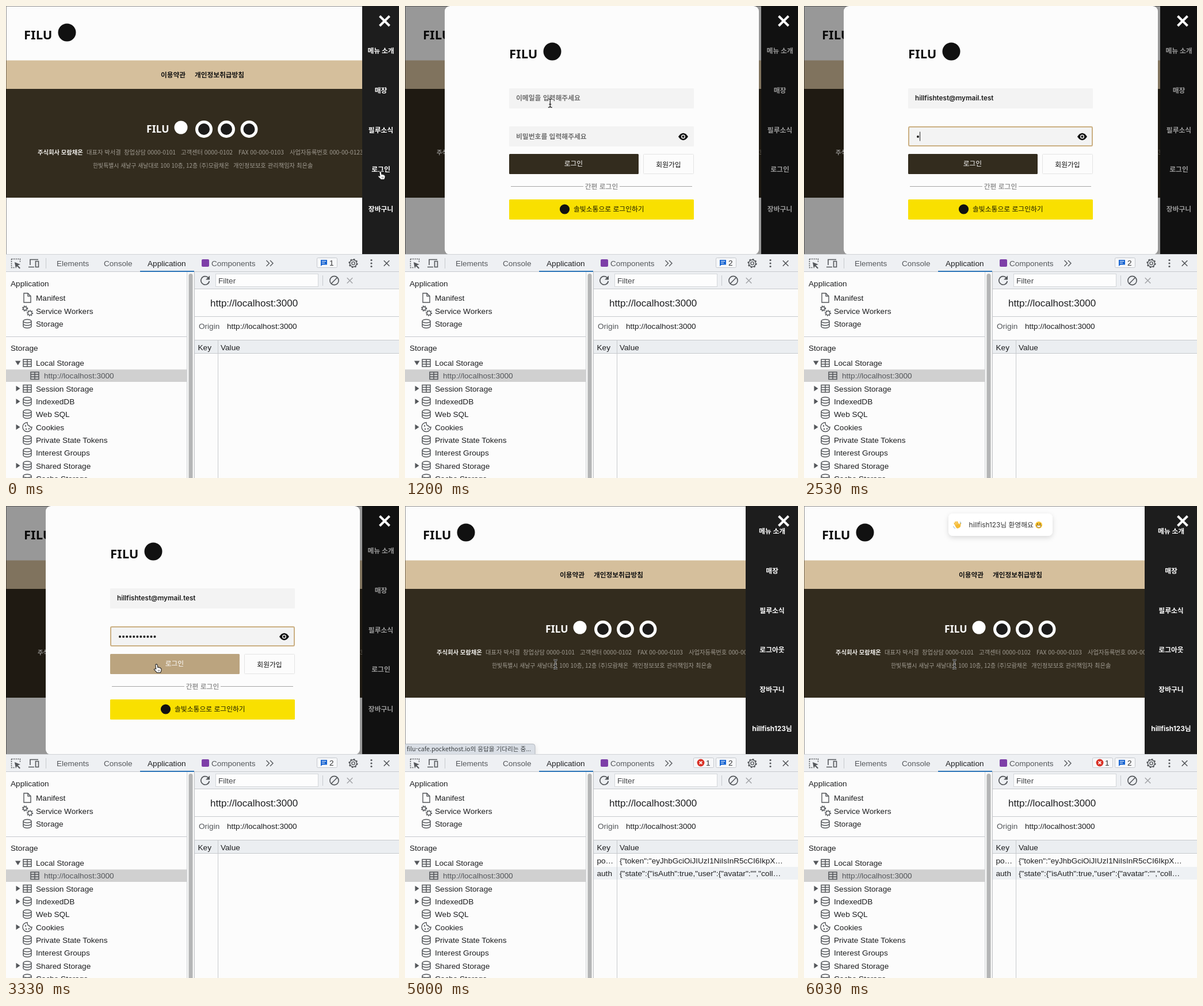
Write an HTML page that moves like this. It is 683 px wide and 820 px high and loops after 6630 ms.

```html
<!DOCTYPE html>
<html lang="ko">
<head>
<meta charset="utf-8">
<title>Login flow</title>
<style>
html, body { margin: 0; width: 100%; height: 100%; overflow: hidden; background: #fcfcfc; }
svg { display: block; width: 100vw; height: 100vh; }
text { white-space: pre; }
.sans { font-family: "Liberation Sans", Arial, sans-serif; }
.kr { font-family: "Noto Sans CJK KR", "Noto Sans CJK", sans-serif; }
.latin { font-family: Inter, "Noto Sans CJK KR", sans-serif; }
.logo { font-family: "Noto Sans", "Open Sans", sans-serif; }
</style>
</head>
<body>
<svg id="stage" viewBox="0 0 683 820"></svg>
<script>
const LOOP = 6630;
const AT = { modal: 330, focus: 1600, type: 1900, typed: 2450, pass: 2480, passType: 2520,
  passEnd: 2780, move: 2850, click: 3470, done: 5000, loaded: 5670 };
const USER = 'hillfish123', EMAIL = 'hillfishtest@mymail.test', PASS_LEN = 11;
const GRAY = '#54575b', INK = '#1d1e20', DARK = '#332c1e', PAPER = '#fcfcfc', GOLD = '#cbb083';

// Markup helpers
const text = (x, y, s, size, fill = INK, weight = 400, cls = 'kr', anchor = 'start', id = '') =>
  `<text ${id && `id="${id}"`} class="${cls}" x="${x}" y="${y}" font-size="${size}" fill="${fill}" font-weight="${weight}" text-anchor="${anchor}">${s}</text>`;
const ui = (x, y, s, fill = INK, size = 13.6) => text(x, y, s, size, fill, 400, 'sans');
const rect = (x, y, w, h, fill, extra = '') => `<rect x="${x}" y="${y}" width="${w}" height="${h}" fill="${fill}" ${extra}/>`;
const dot = (x, y, r, fill, extra = '') => `<circle cx="${x}" cy="${y}" r="${r}" fill="${fill}" ${extra}/>`;
const line = (d, stroke = GRAY, width = 1.4, extra = '') =>
  `<path d="${d}" fill="none" stroke="${stroke}" stroke-width="${width}" ${extra}/>`;
const rule = (d, stroke = '#c6c9cd') => line(d, stroke, 1);
const cross = (x, y, r, stroke, width) =>
  line(`M${x - r} ${y - r}L${x + r} ${y + r}M${x + r} ${y - r}L${x - r} ${y + r}`, stroke, width);
const group = (id, body, extra = '') => `<g id="${id}" ${extra}>${body}</g>`;
const dots = (x, y, n, step, r, fill) =>
  Array.from({ length: n }, (_, i) => dot(x + i * step, y, r, fill)).join('');

// Small icons, centred on x, y
const icon = {
  file: (x, y) => line(`M${x - 6} ${y - 8}H${x + 1}L${x + 6} ${y - 3}V${y + 8}H${x - 6}ZM${x + 1} ${y - 8}V${y - 3}H${x + 6}`),
  gears: (x, y) => [[-4, -4, 3], [4.5, 4, 3.4]].map(([a, b, r]) =>
    dot(x + a, y + b, r, 'none', `stroke="${GRAY}" stroke-width="1.4"`) +
    dot(x + a, y + b, r + 1.4, 'none', `stroke="${GRAY}" stroke-width="1.6" stroke-dasharray="1.7 1.9"`)).join(''),
  db: (x, y) => line(`M${x - 7} ${y - 4.5}a7 3 0 0 1 14 0a7 3 0 0 1 -14 0V${y + 4.5}a7 3 0 0 0 14 0V${y - 4.5}M${x - 7} ${y}a7 3 0 0 0 14 0`, GRAY, 1.5),
  grid: (x, y) => line(`M${x - 7} ${y - 6}H${x + 7}V${y + 6.5}H${x - 7}ZM${x - 7} ${y - 2}H${x + 7}M${x - 7} ${y + 2.3}H${x + 7}M${x} ${y - 6}V${y + 6.5}`, GRAY, 1.5),
  cookie: (x, y) => line(`M${x} ${y - 8}a8 8 0 1 0 8 8q-3 1-4-2q-4 0-4-6Z`) + dot(x - 3, y - 2, 1.2, GRAY) + dot(x - 2, y + 3.5, 1.2, GRAY) + dot(x + 3, y + 3, 1.2, GRAY),
};
const brand = (x, y, size, fill, mx, my, r) =>
  text(x, y, 'FILU', size, fill, 600, 'logo') + dot(mx, my, r, fill);

function page() {
  const foot = '#a19c92';
  const info = [[140, '대표자 박서결'], [205, '창업상담 0000-0101'], [304, '고객센터 0000-0102'],
    [404, 'FAX 00-000-0103'], [493, '사업자등록번호 000-00-01234']];
  return rect(0, 0, 683, 432, PAPER) + rect(0, 94.5, 683, 50, '#d5bf9c') + rect(0, 144, 683, 189, DARK) +
    brand(31, 57.5, 22, '#111', 106, 46, 15.5) +
    text(269, 123.5, '이용약관', 11.7, '#111', 700) + text(328, 123.5, '개인정보취급방침', 11.7, '#111', 700) +
    brand(244, 219.8, 17.6, '#fff', 304, 211, 11.5) +
    [344, 383, 422.5].map(x => dot(x, 214, 15, '#fff') + dot(x, 214, 10, '#1c1b1a')).join('') +
    text(55, 258, '주식회사 모람채온', 10.3, '#f2f0ec', 600) +
    info.map(([x, s]) => text(x, 258, s, 10.3, foot, 300)).join('') +
    text(151, 281, '한빛특별시 새날구 새날대로 100 10층, 12층 (주)모람채온', 9.9, foot, 300) +
    text(395, 281, '개인정보보호 관리책임자 최은솔', 10.3, foot, 300) +
    line('M0 .5H683M.5 1V432', '#000', 1, 'opacity=".42"');
}

function menu(id, x, cx, y, items) {
  return group(id, rect(x, 0, 683 - x, 432, '#1d1d1d') +
    items.map((s, i) => text(cx, y + i * 68.6 + 4.4, s, 11.8, '#fff', 700, 'latin', 'middle')).join(''));
}

function modal() {
  const field = y => rect(181, y, 321, 35, '#f3f3f3', 'rx="1"');
  const ring = (id, y) => rect(182, y + 1, 319, 33, '#f3f3f3', `id="${id}" rx="2" stroke="${GOLD}" stroke-width="2"`);
  return rect(69, 0, 546, 432, PAPER, 'rx="9"') +
    brand(181, 90.5, 22, '#111', 256, 79, 15.5) +
    field(143) + ring('ringMail', 143) + field(209) + ring('ringPass', 209) +
    text(193, 164.3, '이메일을 입력해주세요', 11.8, '#6f6f6f', 600, 'kr', 'start', 'hintMail') +
    text(193, 164.3, '', 11.7, '#1b1b1b', 600, 'latin', 'start', 'mail') +
    text(193, 230.5, '비밀번호를 입력해주세요', 11.8, '#6f6f6f', 600, 'kr', 'start', 'hintPass') +
    group('bullets', dots(196, 227, PASS_LEN, 6.05, 2, '#1b1b1b')) +
    line('M0 0V16', '#222', 1, 'id="caret"') +
    '<path d="M475 227Q483.5 214.5 492 227Q483.5 239.5 475 227Z" fill="#111"/>' +
    dot(483.5, 227, 3.5, '#f3f3f3') + dot(483.5, 227, 2.1, '#111') +
    rect(181, 257, 225, 35, DARK, 'id="login" rx="1.5"') +
    text(293, 278, '로그인', 11.7, '#fff', 500, 'kr', 'middle') +
    rect(414.5, 257.5, 87, 34, PAPER, 'rx="1" stroke="#e4e4e4"') +
    text(458, 280, '회원가입', 11.8, '#111', 500, 'kr', 'middle') +
    rule('M184 313.5H310M373 313.5H499', '#a5a5a5') +
    text(341.5, 317.5, '간편 로그인', 11.8, '#9a9a9a', 600, 'kr', 'middle') +
    rect(181, 336, 321, 35, '#f9e000', 'rx="1.5"') + dot(277.5, 353, 8.6, '#111') +
    text(293, 357.3, '솔빛소통으로 로그인하기', 11.8, '#1a1a00', 500) + suggestions();
}

function suggestions() {
  const rows = [['mango@mail.test', 9], ['tango77@abc.test', 11], ['demo@x.test', 8]];
  return group('suggest',
    '<path d="M273 186H281L288 180.5L295 186H437Q441 186 441 190V385Q441 389 437 389H273Q269 389 269 385V190Q269 186 273 186Z" fill="#fdfdfd" stroke="#d2d2d2" stroke-width=".6" filter="url(#shadow)"/>' +
    rows.map(([s, n], i) => {
      const y = 210.5 + i * 51.7;
      return dot(287, y + 5.5, 6.5, '#111') + text(305, y, s, 12.2, '#222', 400, 'latin') + dots(307.5, y + 16, n, 5.4, 1.2, '#444');
    }).join('') +
    rule('M269 349.5H441', '#dedede') + dot(287, 369, 6.3, '#666') +
    text(305, 373, '비밀번호 관리...', 11.2, '#444') + dot(418, 369, 4.6, '#2f78d8'));
}

function toast() {
  return group('toast', rect(251, 13, 181, 39, '#fff', 'rx="8" filter="url(#shadow)"') +
    '<g transform="translate(266 33) rotate(-28)">' + rect(-3.5, -1, 8, 7, '#f5bb35', 'rx="3"') +
    line('M-2.5 1V-5M0 1V-6M2.5 1V-5M3.5 4L6.5 0', '#f5bb35', 2, 'stroke-linecap="round"') + '</g>' +
    line('M259.5 35Q260 38 263 39M271 27Q273 29 273 31', '#7aa7c4', .8) +
    text(286.5, 37, `${USER}님 환영해요`, 11.8, '#363636', 400, 'latin') +
    dot(408, 33, 6, '#f7c22e') + dot(405.7, 31.2, .9, '#5a3a12') + dot(410.3, 31.2, .9, '#5a3a12') +
    '<path d="M404 33.5H412Q411 37.5 408 37.5T404 33.5Z" fill="#fff" stroke="#6b4517" stroke-width=".7"/>');
}

function tabs() {
  const badge = x => rect(x + .5, 437.5, 35, 17, '#f6f7f9', 'rx="2" stroke="#c6c9ce"');
  return rect(0, 431, 683, 31, '#eef0f3') + rule('M0 431.5H683', '#d0d3d7') + rule('M0 461.5H683') +
    line('M9.5 439.5H24.5V446M9.5 439.5V454.5H16', GRAY, 1.5, 'stroke-dasharray="2 1.6"') +
    `<path d="M15 445L25 449L20.5 450.5L25 455L23.5 456.5L19 452L17 456Z" fill="${GRAY}"/>` +
    line('M42 450V440.5H56M39 453.5H49M51.5 443.5H56.5V453.5H51.5Z', GRAY, 1.6) + rule('M69.5 438V456') +
    ui(88, 452, 'Elements', GRAY, 13.5) + ui(170, 452, 'Console', GRAY, 13.5) + ui(246, 452, 'Application') +
    rect(233, 460, 94, 2, '#2b74b8') + rect(340, 440, 13, 13, '#7d3fa8', 'rx="2"') +
    ui(357, 452, 'Components', GRAY, 13.5) +
    line('M452.5 442L457.5 447L452.5 452M459 442L464 447L459 452') +
    group('errors', badge(501) + dot(514, 446, 6.4, '#d93025') + cross(514, 446, 2.4, '#fff', 1.5) + ui(523, 451, '1', '#333')) +
    badge(540) + '<path d="M547 441H558V449.5H550L547 452Z" fill="#1a66d2"/>' + rule('M549 443.5H556M549 446.5H554', '#fff') +
    text(562, 451, '1', 13.6, '#333', 400, 'sans', 'start', 'issues') +
    dot(603.5, 447, 2.6, 'none', `stroke="${GRAY}" stroke-width="1.4"`) +
    dot(603.5, 447, 6, 'none', `stroke="${GRAY}" stroke-width="1.5"`) +
    dot(603.5, 447, 7.2, 'none', `stroke="${GRAY}" stroke-width="1.8" stroke-dasharray="2.8 2.85"`) +
    [441.5, 447, 452.5].map(y => dot(635, y, 1.6, GRAY)).join('') + cross(661.5, 447, 4.8, GRAY, 1.6);
}

function tree() {
  // label, y, icon, arrow (1 closed, 2 open)
  const rows = [['Manifest', 507, 'file'], ['Service Workers', 529.5, 'gears'], ['Storage', 552, 'db'],
    ['Local Storage', 620, 'grid', 2], ['Session Storage', 664.5, 'grid', 1], ['IndexedDB', 687, 'db', 1],
    ['Web SQL', 709, 'db'], ['Cookies', 731.5, 'cookie', 1], ['Private State Tokens', 754, 'db'],
    ['Interest Groups', 776, 'db'], ['Shared Storage', 798.5, 'db', 1], ['Cache Storage', 821, 'db']];
  const arrow = (y, a) => !a ? '' : `<path fill="${GRAY}" d="${a > 1 ? `M16 ${y - 3.5}H25.5L20.7 ${y + 4}Z` : `M17.5 ${y - 4.7}V${y + 4.7}L24.5 ${y}Z`}"/>`;
  return rect(0, 462, 314, 358, PAPER) + ui(8, 486.5, 'Application') + rule('M0 574.5H314') + ui(8, 599, 'Storage') +
    rect(0, 631.5, 314, 21.5, '#d0d0d0') + icon.grid(50, 642) + ui(66, 647.3, 'http://localhost:3000', GRAY) +
    rows.map(([s, y, kind, a]) => arrow(y, a) + icon[kind](37, y) + ui(52, y + 5, s)).join('') +
    rect(314, 462, 14, 358, '#f7f7f7') + rule('M314.5 462V820', '#d3d5d8') + rule('M327.5 462V820', '#bdbfc2') +
    rect(317.5, 465, 7, 370, '#b4b5b6', 'rx="3.5"');
}

function storage() {
  return rect(328, 462, 355, 358, PAPER) + rect(328, 462, 355, 29, '#eef0f3') + rule('M328 491.5H683M328 539.5H683') +
    line('M351.5 472A7.3 7.3 0 1 0 353.3 478', GRAY, 1.7) + `<path d="M354 468.5V475.5H347Z" fill="${GRAY}"/>` +
    rect(364.5, 465.5, 178, 22, '#fdfdfd', 'stroke="#d3d6da"') + ui(369, 482, 'Filter', '#444649') +
    rule('M550.5 468V486') + dot(570.5, 477, 7.6, 'none', `stroke="${GRAY}" stroke-width="1.6"`) +
    line('M565.3 482.3L575.7 471.7', GRAY, 1.6) + cross(597.5, 477, 4.8, '#a4a6a9', 1.6) +
    ui(355, 521.5, 'http://localhost:3000', INK, 17) + ui(335, 560.5, 'Origin', GRAY) + ui(384, 560.5, 'http://localhost:3000') +
    rect(328, 580, 355, 24, '#ebeef1') + rule('M328 580.5H683M328 603.5H683') +
    ui(333.5, 597.5, 'Key') + ui(373, 597.5, 'Value') +
    group('rows', rect(328, 627, 355, 22, '#eef1f4') + ui(333.5, 621, 'po…') + ui(333.5, 643, 'auth') +
      ui(373, 621, '{"token":"eyJhbGciOiJIUzI1NiIsInR5cCI6IkpX…', INK, 13.5) +
      ui(373, 643, '{"state":{"isAuth":true,"user":{"avatar":"","coll…', INK, 13.7)) +
    rule('M368.5 580V820');
}

const BEAM = 'M-3.5 -7.5Q0 -7.5 0 -5.5Q0 -7.5 3.5 -7.5M0 -5.5V5.5M-3.5 7.5Q0 7.5 0 5.5Q0 7.5 3.5 7.5M-2 2H2';
const pointers = () => group('pointer',
  group('hand', '<path d="M-1.7 1Q0 -1.3 1.5 1L2.3 5.5L3.7 5L5 6L6.5 5.8L7.3 7L8.4 7.6V11L7 14.5H1L-4 9.3Q-4.2 7.3 -.8 8.3Z" fill="#fff" stroke="#222" stroke-width="1.1"/>' + line('M3 9.5V12.5M5 9.5V12.5', '#333', .7)) +
  group('arrow', '<path d="M0 0V13.5L3.2 10.6L5.4 15.4L7.6 14.4L5.5 9.8H9.8Z" fill="#111" stroke="#fff" stroke-width="1.1"/>') +
  group('beam', line(BEAM, '#fff', 2.6, 'stroke-opacity=".8"') + line(BEAM, '#222', 1.3)));

document.getElementById('stage').innerHTML =
  '<defs><filter id="shadow" x="-10%" y="-60%" width="120%" height="250%"><feDropShadow dx="0" dy="3" stdDeviation="4" flood-opacity=".14"/></filter></defs>' +
  page() +
  menu('menuOut', 619, 651.5, 78, ['메뉴 소개', '매장', '필루소식', '로그인', '장바구니']) +
  menu('menuIn', 592, 638, 44, ['메뉴 소개', '매장', '필루소식', '로그아웃', '장바구니', `${USER}님`]) +
  group('modal', rect(0, 0, 683, 432, '#000', 'opacity=".4"') + modal()) +
  cross(658, 26, 8.5, '#fff', 4) + toast() +
  group('status', '<path d="M0 413.5H222Q226 413.5 226 417.5V432H0Z" fill="#d9dee5" stroke="#b3b8bf" filter="url(#shadow)"/>' +
    text(3, 426.3, 'filu-cafe.pockethost.io의 응답을 기다리는 중...', 10.6, '#3c4043')) +
  tabs() + tree() + storage() + pointers();

const el = {};
document.querySelectorAll('#stage [id]').forEach(n => el[n.id] = n);
const show = (id, on) => el[id].setAttribute('visibility', on ? 'inherit' : 'hidden');
const clamp = p => Math.max(0, Math.min(1, p));
const span = (t, a, b) => clamp((t - a) / (b - a));
const easeIn = p => p * p, easeOut = p => 1 - (1 - p) ** 3;
const easeBoth = p => p * p * (3 - 2 * p);

// start, end, x, y, easing
const START = [650.5, 287];
const MOVES = [[440, 700, 628, 291, easeIn], [700, 1450, 238, 164, easeOut], [AT.move, 3180, 261.5, 275, easeBoth]];

function mouseAt(t) {
  let [x, y] = START;
  for (const [a, b, tx, ty, ease] of MOVES) {
    const p = ease(span(t, a, b));
    x += (tx - x) * p;
    y += (ty - y) * p;
  }
  return [x, y];
}

function pointerKind(t, x, y) {
  if (t < AT.modal) return 'hand';
  if (t >= AT.done) return 'beam';
  const inside = (top, right) => x > 181 && x < right && y > top && y < top + 35;
  if (inside(143, 502) || inside(209, 502)) return 'beam';
  return inside(257, 406) ? 'hand' : 'arrow';
}

function update(t) {
  const open = t >= AT.modal && t < AT.done, done = t >= AT.done;
  const onMail = open && t >= AT.focus && t < AT.pass;
  const onPass = open && t >= AT.pass && t < AT.click;
  const chars = Math.ceil(span(t, AT.type, AT.typed) * EMAIL.length);
  const keys = Math.ceil(span(t, AT.passType, AT.passEnd) * PASS_LEN);

  show('menuOut', !done);
  show('menuIn', done);
  show('modal', open);
  show('errors', done);
  show('rows', done);
  show('status', done && t < AT.loaded);
  el.issues.textContent = t < AT.modal ? '1' : '2';

  show('ringMail', onMail);
  show('ringPass', onPass);
  show('hintMail', !chars);
  show('hintPass', !keys);
  show('suggest', onMail && !chars);
  el.mail.textContent = EMAIL.slice(0, chars);
  const mailX = onMail ? 195 : 193, shift = onPass ? 2 : 0;
  el.mail.setAttribute('x', mailX);
  el.hintMail.setAttribute('x', mailX);
  el.hintPass.setAttribute('x', 193 + shift);
  el.bullets.setAttribute('transform', `translate(${shift} 0)`);
  [...el.bullets.children].forEach((n, i) => n.setAttribute('visibility', i < keys ? 'inherit' : 'hidden'));

  const lastKey = [AT.focus, AT.typed, AT.passEnd].filter(k => k <= t).pop() || 0;
  show('caret', (onMail || onPass) && (t - lastKey) % 1060 < 530);
  const caretX = onPass ? 195.5 + keys * 6.05 : 195.5 + (chars ? el.mail.getComputedTextLength() : 0);
  el.caret.setAttribute('transform', `translate(${caretX} ${onPass ? 218.5 : 152})`);

  const [x, y] = mouseAt(t), kind = pointerKind(t, x, y);
  ['hand', 'arrow', 'beam'].forEach(k => show(k, k === kind));
  show('pointer', t < AT.type || t >= AT.move);
  el.pointer.setAttribute('transform', `translate(${x} ${y})`);
  el.login.setAttribute('fill', kind === 'hand' && open ? '#bba47f' : DARK);

  const p = easeOut(span(t, AT.done, AT.done + 350)), s = .6 + .4 * p;
  show('toast', done);
  el.toast.setAttribute('opacity', .5 + .5 * p);
  el.toast.setAttribute('transform', `translate(341.5 ${32.5 - 78 * (1 - p)}) scale(${s}) translate(-341.5 -32.5)`);
}

const begin = performance.now();
function frame() {
  update((performance.now() - begin) % LOOP);
  requestAnimationFrame(frame);
}
frame();
</script>
</body>
</html>
```
